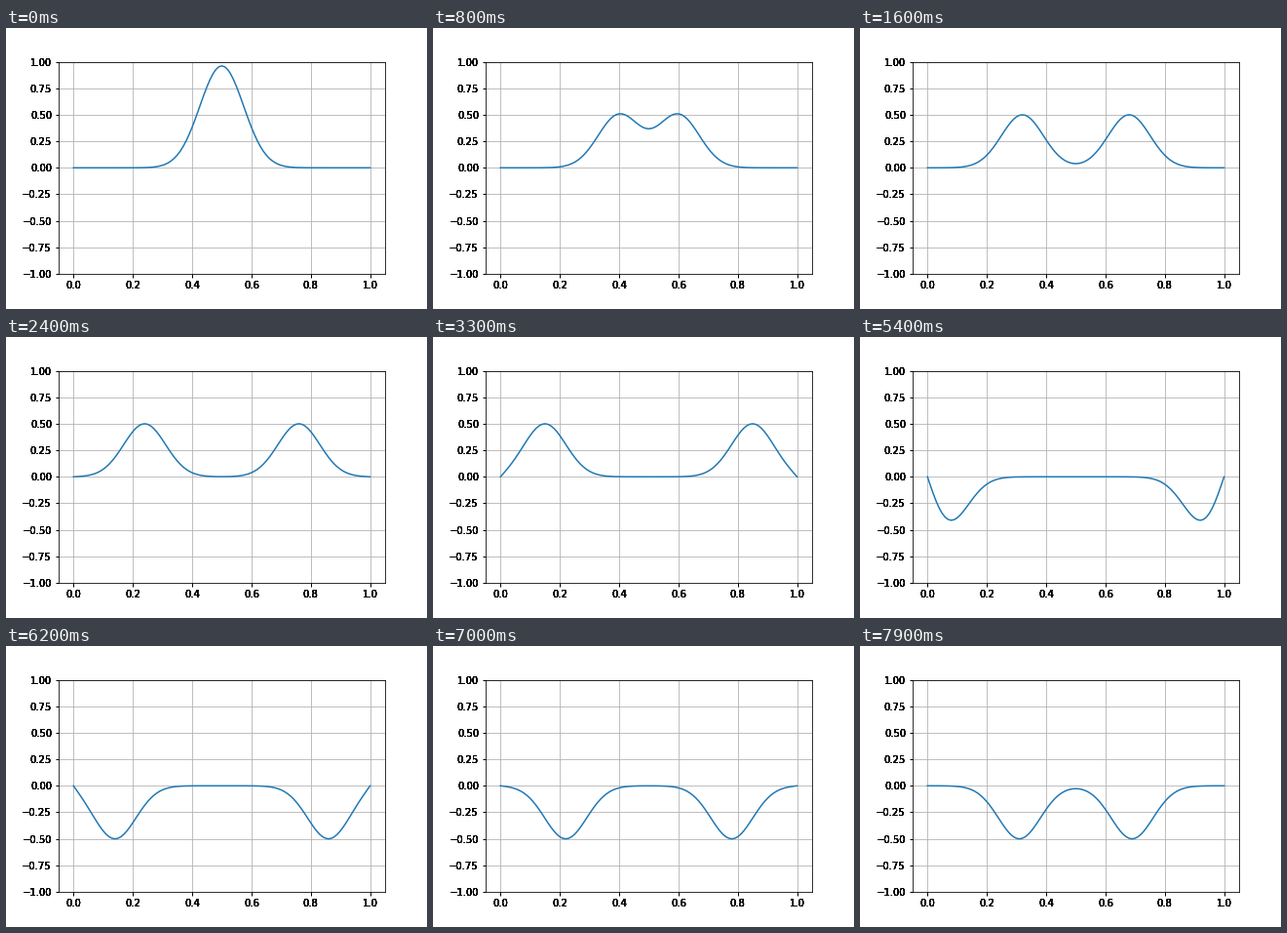
A matplotlib script for the animation above (8000 ms loop, 432 by 288 pixels).

```python
import numpy as np
import matplotlib.pyplot as plt
from matplotlib.animation import FuncAnimation

FRAMES = 80
STEP = 0.01     # distance travelled per frame
OFFSET = 0.02   # distance already travelled at the start
LAYERS = 8      # stacked copies give the labels their hard, dark edges

plt.rcParams["font.family"] = "DejaVu Sans"
plt.rcParams["font.size"] = 10


def pulse(s):
    """Gaussian at 0.5, extended as an odd function of period 2."""
    s = (s + 1) % 2 - 1
    total = np.zeros_like(s)
    for k in (-2, 0, 2):
        total += np.exp(-100 * (s - 0.5 - k) ** 2)
        total -= np.exp(-100 * (s + 0.5 - k) ** 2)
    return total


def wave(x, d):
    """Standing string with fixed ends (d'Alembert solution)."""
    return 0.5 * (pulse(x + d) + pulse(x - d))


def label(x, y, value, digits, placement):
    trans, va, ha = placement
    text = f"{value:.{digits}f}".replace("-", "\u2212")
    for _ in range(LAYERS):
        ax.text(x, y, text, transform=trans, va=va, ha=ha)


fig, ax = plt.subplots(figsize=(6, 4), dpi=72, facecolor="white")
fig.subplots_adjust(left=0.125, right=0.9, bottom=0.125, top=0.88)

x = np.linspace(0, 1, 101)
xticks = np.linspace(0, 1, 6)
yticks = np.linspace(-1, 1, 9)
ax.set_xlim(-0.05, 1.05)
ax.set_ylim(-1, 1)
ax.set_xticks(xticks)
ax.set_yticks(yticks)
ax.tick_params(width=1, labelbottom=False, labelleft=False)
ax.grid(True, color="#b0b0b0", linewidth=0.8)

for v in xticks:
    label(v, 0, v, 1, ax.get_xaxis_text1_transform(7))
for v in yticks:
    label(0, v, v, 2, ax.get_yaxis_text1_transform(7))

line, = ax.plot(x, wave(x, OFFSET), color="#1f77b4", linewidth=1.5)


def update(i):
    line.set_ydata(wave(x, OFFSET + STEP * i))
    return line,


anim = FuncAnimation(fig, update, frames=FRAMES, interval=100,
                     repeat=True, repeat_delay=0, blit=False)
plt.show()
```
